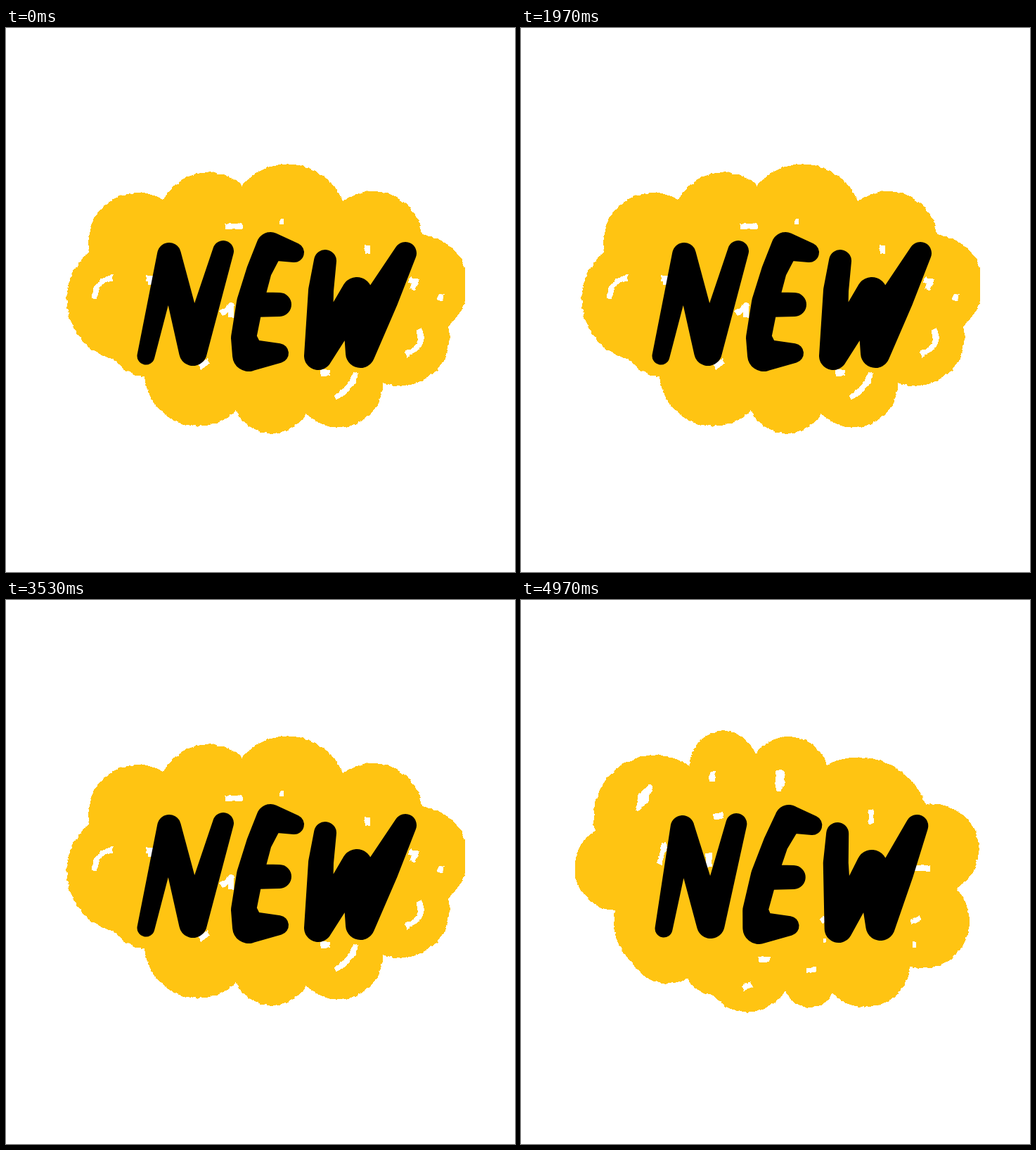
Write an HTML page that moves like this. It is 724 px wide and 773 px high and loops after 5060 ms.

```html
<!DOCTYPE html>
<html lang="en">
<head>
<meta charset="utf-8">
<title>New</title>
<style>
  html, body { margin: 0; width: 100%; height: 100%; overflow: hidden; background: #fff; }
  svg { display: block; width: 724px; height: 773px; }
  .cloud { fill: #ffc412; shape-rendering: crispEdges; }
  .gap { fill: none; stroke: #fff; stroke-width: 8; stroke-linejoin: round; shape-rendering: crispEdges; }
</style>
</head>
<body>
<svg id="stage" viewBox="0 0 724 773" role="img" aria-label="NEW">
  <defs>
    <filter id="rough" filterUnits="userSpaceOnUse" x="0" y="0" width="724" height="773" color-interpolation-filters="sRGB">
      <feTurbulence type="fractalNoise" baseFrequency=".12" numOctaves="2" seed="4"/>
      <feDisplacementMap in="SourceGraphic" scale="5" xChannelSelector="R" yChannelSelector="G"/>
    </filter>
    <clipPath id="trim"><rect x="77" y="180" width="576" height="412"/></clipPath>
  </defs>
</svg>
<script>
const LOOP = 5060, CYCLE = 1300, STEPS = 10;
const MIDDLE = 376;

// Bumps run clockwise: start corner x,y and height of the arc to the next corner.
// Gaps are the bare spots left by the brush.
const clouds = [
  {
    bumps: "224,244,28 336,224,41 479,246,35 592,294,46 629,423,37 536,504,40 427,548,30 327,544,44 197,495,6 155,471,49 118,319,42",
    gaps: "M126 384Q127 358 152 355M199 356h8v8M312 282h24M389 275h6M306 406l14-12v18M276 482l12-9M447 490h14M468 525Q492 512 497 490M514 309v12M573 358l10 2-5 12M616 388l4-10M587 428Q599 452 568 464"
  },
  {
    bumps: "232,240,38 336,222,38 450,236,32 578,292,45 622,416,44 546,510,38 440,554,26 352,556,38 234,530,24 160,484,10 106,432,32 112,324,44",
    gaps: "M153 328L168 316M268 260h12M368 262h8M306 406l12-8M504 308v10M575 376h10M580 456l6-8M448 492h12"
  },
  {
    bumps: "240,236,41 334,219,32 435,234,34 576,291,53 619,410,49 554,521,37 443,559,22 376,555,27 273,562,5 235,538,17 158,514,11 134,441,44 106,328,56",
    gaps: "M167 296l4-18 12-11-5 15zM272 244v14M366 246v22l5-6v-16zM498 298v20M274 309l14-3M204 346l-7 30M267 360v20M560 381h22M554 458l14-6M338 511h16M406 526l14-1M315 552l12-6M427 457l6-5M430 484h4M557 489h6"
  }
];

// Each letter is a set of pen strokes through discs x,y,r; it leans more with every pose.
const letters = [
  { lean: .045, strokes: ["199,466,12.5 232,322,17 266,460,20 309,317,15"] },
  { lean: -.075, strokes: ["410,319,14 376,310,20 360,345,18 347,390,19 338,440,18 345,465,23 388,462,14", "350,393,18 389,393,17"] },
  { lean: .085, strokes: ["454,331,16 448,373,18 444,466,20 499,376,22 504,462,21 534,385,24 568,320,16"] }
];

const parse = text => text.split(" ").map(p => p.split(",").map(Number));

function cloudPath(text) {
  const bumps = parse(text);
  let d = `M${bumps[0][0]} ${bumps[0][1]}`;
  bumps.forEach(([x, y, h], i) => {
    const [nx, ny] = bumps[(i + 1) % bumps.length];
    const half = Math.hypot(nx - x, ny - y) / 2;
    const r = (half * half + h * h) / (2 * h);
    d += `A${r} ${r} 0 ${+(h > half)} 1 ${nx} ${ny}`;
  });
  return d + "Z";
}

// Outline around two discs and the space between them.
function capsule([ax, ay, ar], [bx, by, br]) {
  const dir = Math.atan2(by - ay, bx - ax);
  const open = Math.acos((ar - br) / Math.hypot(bx - ax, by - ay));
  const rim = (x, y, r, a) => `${x + r * Math.cos(a)} ${y + r * Math.sin(a)}`;
  const wide = +(open > Math.PI / 2);
  return `M${rim(ax, ay, ar, dir + open)}L${rim(bx, by, br, dir + open)}` +
    `A${br} ${br} 0 ${wide} 0 ${rim(bx, by, br, dir - open)}` +
    `L${rim(ax, ay, ar, dir - open)}A${ar} ${ar} 0 ${1 - wide} 0 ${rim(ax, ay, ar, dir + open)}Z`;
}

function letterPath({ lean, strokes }, amount) {
  return strokes.map(text => {
    const discs = parse(text).map(([x, y, r]) => [x + lean * amount * (y - MIDDLE), y + amount, r]);
    return discs.slice(1).map((disc, i) => capsule(discs[i], disc)).join("");
  }).join("");
}

function add(parent, tag, attrs) {
  const el = document.createElementNS("http://www.w3.org/2000/svg", tag);
  for (const key in attrs) el.setAttribute(key, attrs[key]);
  return parent.appendChild(el);
}

const stage = document.getElementById("stage");
const poses = clouds.map(({ bumps, gaps }, i) => {
  const pose = add(stage, "g", { display: "none" });
  const trimmed = add(pose, "g", { "clip-path": "url(#trim)" });
  const blob = add(trimmed, "g", { filter: "url(#rough)" });
  add(blob, "path", { class: "cloud", d: cloudPath(bumps) });
  add(blob, "path", { class: "gap", d: gaps });
  for (const letter of letters) {
    add(pose, "path", { d: letterPath(letter, i / (clouds.length - 1)) });
  }
  return pose;
});

// Ten steps per cycle, on a 7.5 fps grid rounded to 10 ms.
function stepAt(t) {
  const local = t % CYCLE;
  let s = 0;
  while (s < STEPS - 1 && local >= Math.round((s + 1) * 40 / 3) * 10) s++;
  return Math.floor(t / CYCLE) * STEPS + s;
}

let shown = -1;
const start = performance.now();
function draw(now) {
  const pose = stepAt(Math.max(0, now - start) % LOOP) % poses.length;
  if (pose !== shown) {
    poses.forEach((g, i) => g.setAttribute("display", i === pose ? "inline" : "none"));
    shown = pose;
  }
  requestAnimationFrame(draw);
}
draw(start);
</script>
</body>
</html>
```
